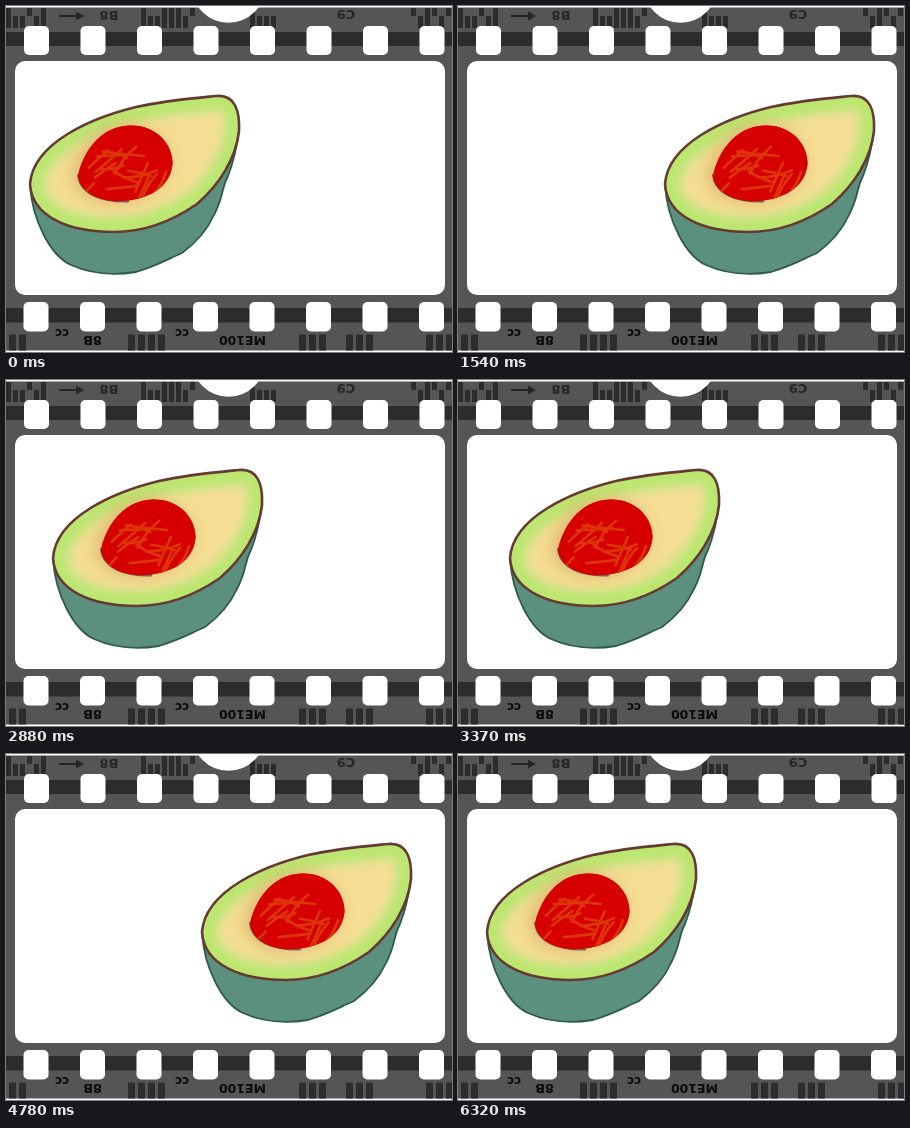
Write an HTML page with a canvas that moves like this. It is 446 px wide and 346 px high and loops after 6.4 s.

```html
<!DOCTYPE html>
<html lang="en">
<head>
<meta charset="utf-8">
<title>Avocado on film</title>
<style>
html, body { margin: 0; width: 100%; height: 100%; overflow: hidden; background: #fff; }
canvas { display: block; width: 446px; height: 346px; }
</style>
</head>
<body>
<canvas id="stage" width="446" height="346"></canvas>
<script>
const W = 446, H = 346, LOOP = 6400;
const ctx = document.getElementById('stage').getContext('2d');

const rim = new Path2D(`M24 178 C27 137 85 112 130 101 C160 94.5 190 92 210 90
  C229 88 234 105 233 125 C230 153 213 179 191 198
  C165 216 138 226 108 226 C63 226 26 211 24 178Z`);
const skin = new Path2D(`M24 178 C26 215 45 250 65 259 C85 268 105 270 130 266
  C150 260 158 255 176 247 C195 233 203 220 208 209
  C218 190 215 183 222 170 C228 155 231 140 233 124`);
const pit = new Path2D(`M72 170 C76 150 92 120 124 119.5 C150 119 167 138 166.5 158
  C164 182 142 194 112 195.5 C95 195 74 188 72 170Z`);
const pitEdge = new Path2D('M72 169 C74 188 95 196 122 195.5');

function seededRandom(seed) {
  return () => (seed = seed * 16807 % 2147483647) / 2147483647;
}

function layer(paint) {
  const canvas = document.createElement('canvas');
  canvas.width = W;
  canvas.height = H;
  paint(canvas.getContext('2d'));
  return canvas;
}

function stroke(c, path, color, width) {
  c.strokeStyle = color;
  c.lineWidth = width;
  c.stroke(path);
}

function fill(c, path, color) {
  c.fillStyle = color;
  c.fill(path);
}

function rounded(c, x, y, w, h, r) {
  c.beginPath();
  c.roundRect(x, y, w, h, r);
  c.fill();
}

function turnedText(c, text, x, y, size) {
  c.save();
  c.translate(x, y);
  c.rotate(Math.PI);
  c.font = `bold ${size}px "DejaVu Sans", sans-serif`;
  c.textAlign = 'center';
  c.fillText(text, 0, size * 0.36);
  c.restore();
}

// Two staggered rows of marks along the upper edge.
function upperCode(c, from, to, random) {
  for (let x = from; x < to - 3; x += 7) {
    const tall = random() < 0.3, low = random() < 0.6;
    c.fillRect(x, low && !tall ? 10 : 2, 5, tall ? 20 : low ? 12 : 8);
  }
}

function lowerCode(c, from, to) {
  for (let x = from; x < to - 3; x += 10) c.fillRect(x, 328.5, 7, 16);
}

function paintFilm(c) {
  c.fillStyle = '#fff';
  c.fillRect(0, 0, W, H);
  c.fillStyle = '#555';
  c.fillRect(0, 1.5, W, 343);
  c.fillStyle = '#2c2c2c';
  c.fillRect(0, 26, W, 14);
  c.fillRect(0, 302, W, 14.5);

  const random = seededRandom(29);
  for (const [from, to] of [[0, 44], [135, 190], [244, 272], [405, 446]])
    upperCode(c, from, to, random);
  for (const [from, to] of [[3, 25], [122, 156], [293, 326], [340, 368], [420, 446]])
    lowerCode(c, from, to);

  c.fillStyle = '#262626';
  turnedText(c, 'B8', 103, 10, 13);
  turnedText(c, 'C9', 340, 9, 13);
  c.fillRect(53, 9, 19, 2);
  c.fill(new Path2D('M70 5.5L78 10L70 14.5Z'));
  c.fillStyle = '#0c0c0c';
  turnedText(c, '8B', 86.5, 334.5, 13);
  turnedText(c, 'ME100', 236.5, 334, 12.5);
  turnedText(c, 'cc', 56, 327, 12);
  turnedText(c, 'cc', 176, 327, 12);

  c.fillStyle = '#fff';
  for (let i = 0; i < 8; i++) {
    rounded(c, 18 + i * 56.5, 20, 25, 29, 5);
    rounded(c, 17.5 + i * 56.5, 296, 25, 29.5, 5);
  }
  rounded(c, 9, 55, 430, 234, 10);
  c.beginPath();
  c.arc(222.5, -20, 36.8, 0, Math.PI * 2);
  c.fill();
}

function paintVeins(c) {
  const random = seededRandom(7);
  const around = (middle, spread) => middle + (random() - 0.5) * spread;
  c.save();
  c.clip(pit);
  for (let i = 0; i < 17; i++) {
    const x = around(119, 80), y = around(159, 62);
    const angle = around(-0.35, 1.8), length = around(28, 16), bend = around(0, 18);
    const dx = Math.cos(angle) * length / 2, dy = Math.sin(angle) * length / 2;
    const vein = new Path2D();
    vein.moveTo(x - dx, y - dy);
    vein.quadraticCurveTo(x - bend * dy / length, y + bend * dx / length, x + dx, y + dy);
    stroke(c, vein, '#dd3408', 2.6);
  }
  c.restore();
}

function paintFruit(c) {
  c.lineJoin = c.lineCap = 'round';
  fill(c, skin, '#5b907f');
  stroke(c, skin, '#2f5b4b', 1.8);

  c.save();
  c.clip(rim);
  fill(c, rim, '#f5df94');
  c.filter = 'blur(4px)';
  stroke(c, rim, '#d3e38a', 34);
  c.filter = 'blur(3px)';
  stroke(c, rim, '#bbe670', 23);
  c.restore();

  c.save();
  c.shadowColor = '#d9b268';
  c.shadowBlur = 18;
  c.shadowOffsetX = -5;
  fill(c, pit, '#d60000');
  c.restore();
  stroke(c, rim, '#663a32', 2.6);
  stroke(c, pitEdge, '#666a62', 2);
  fill(c, pit, '#d60000');
  paintVeins(c);
}

const film = layer(paintFilm);
const fruit = layer(paintFruit);

// Steps last 70 ms, with a 10 ms rest after every thirty.
function stepAt(time) {
  return Math.floor((time - 10 * Math.floor(time / 2110)) / 70);
}

// Steady drift that bounces between both ends of the window.
function offsetAt(step) {
  const left = -4, span = 188, crossing = 22.37;
  const phase = (step + 0.5) / crossing % 2;
  return left + span * (1 - Math.abs(1 - phase));
}

const start = performance.now();
function draw() {
  const time = (performance.now() - start) % LOOP;
  ctx.drawImage(film, 0, 0);
  ctx.drawImage(fruit, Math.round(offsetAt(stepAt(time))), 0);
  requestAnimationFrame(draw);
}
draw();
</script>
</body>
</html>
```
